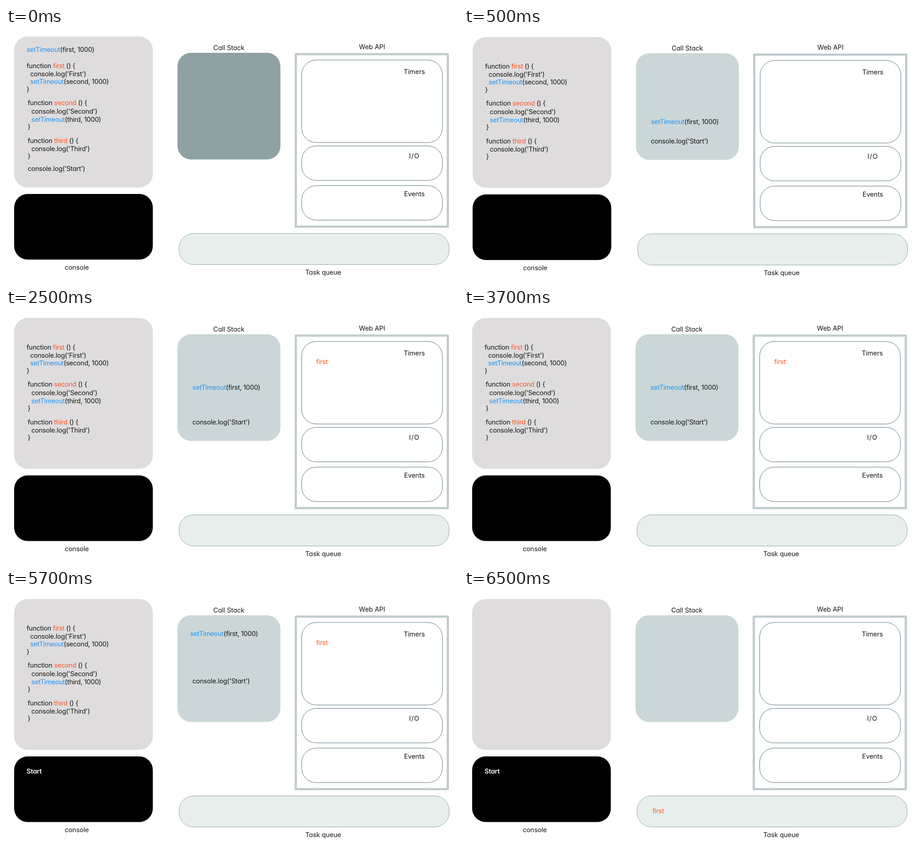
An HTML page for the animation above (8 s loop, 999 px wide and 561 px high).

```html
<!DOCTYPE html>
<html lang="en">
<head>
<meta charset="utf-8">
<title>Event loop</title>
<style>
html, body { margin: 0; width: 100%; height: 100%; overflow: hidden; background: #fff; }
svg { display: block; width: 999px; height: 561px; }
text {
  font: 400 14.6px Inter, Lato, sans-serif;
  font-feature-settings: "cv11";
  letter-spacing: -.28px;
  fill: #161616;
}
.label { text-anchor: middle; letter-spacing: -.1px; }
.wide { letter-spacing: 1px; }
.call { fill: #2196f3; }
.name { fill: #ff5722; }
.out { font-weight: 600; fill: #fff; }
.slot { fill: #fff; stroke: #56717f; }

.stage, .stack, .top, .code, .calls, .pushed, .log, .timer, .printed, .queued {
  animation: 8s step-end infinite;
}
.stage { animation-name: nudge; }
.stack { animation-name: tint; }
.code { animation-name: code; }
.calls { animation-name: calls; }
.pushed { animation-name: pushed; }
.top { animation-name: rise; }
.log { animation-name: log; }
.timer { animation-name: timer; }
.printed { animation-name: printed; }
.queued { animation-name: queued; }

@keyframes nudge {
  0% { transform: none; }
  6.25% { transform: translate(1px, 1px); }
  31.25%, 100% { transform: translate(0, 1px); }
}
@keyframes tint {
  0% { fill: #8ea1a3; }
  6.25%, 100% { fill: #cad6d7; }
}
@keyframes code {
  0% { visibility: visible; }
  81.25%, 100% { visibility: hidden; }
}
@keyframes calls {
  0% { visibility: visible; }
  6.25%, 100% { visibility: hidden; }
}
@keyframes pushed {
  0% { visibility: hidden; }
  6.25% { visibility: visible; }
  81.25%, 100% { visibility: hidden; }
}
@keyframes rise {
  0% { transform: none; }
  31.25% { transform: translate(0, -34px); }
  56.25%, 100% { transform: translate(-5px, -111px); }
}
@keyframes log {
  0% { transform: none; }
  56.25%, 100% { transform: translate(0, -49px); }
}
@keyframes timer {
  0% { visibility: hidden; }
  31.25% { visibility: visible; }
  81.25%, 100% { visibility: hidden; }
}
@keyframes printed {
  0% { visibility: hidden; }
  56.25%, 100% { visibility: visible; }
}
@keyframes queued {
  0% { visibility: hidden; }
  81.25%, 100% { visibility: visible; }
}
</style>
</head>
<body>
<svg viewBox="0 0 999 561">
  <g class="stage">
    <rect x="18" y="19" width="306.5" height="334.5" rx="30" fill="#dedcdd"/>
    <rect x="18" y="368" width="306.5" height="145.5" rx="30"/>
    <rect class="stack" x="379" y="55" width="227.5" height="236.5" rx="30"/>
    <rect x="640.5" y="58" width="336" height="382.5" fill="#fff" stroke="#c2cccf" stroke-width="5" stroke-linejoin="round"/>
    <rect class="slot" x="653.5" y="71" width="311" height="183" rx="32"/>
    <rect class="slot" x="653.5" y="261.5" width="311" height="76.5" rx="32"/>
    <rect class="slot" x="653.5" y="349.5" width="311" height="76.5" rx="32"/>
    <rect x="382.5" y="455.5" width="597" height="69" rx="32" fill="#e7eeeb" stroke="#8ba7a5"/>

    <text class="label" x="492.5" y="49">Call Stack</text>
    <text class="label" x="809" y="47">Web API</text>
    <text class="label" x="902.5" y="102">Timers</text>
    <text class="label wide" x="902.5" y="289">I/O</text>
    <text class="label" x="902.5" y="373">Events</text>
    <text class="label" x="156.5" y="536">console</text>
    <text class="label" x="701" y="547">Task queue</text>

    <g class="calls">
      <text x="45.5" y="53"><tspan class="call">setTimeout</tspan>(first, 1000)</text>
      <text x="48" y="317">console.log('Start')</text>
    </g>

    <g class="code">
      <text x="45.5" y="89">function <tspan class="name">first</tspan> () {</text>
      <text x="53.5" y="107">console.log('First')</text>
      <text x="53.5" y="124"><tspan class="call">setTimeout</tspan>(second, 1000)</text>
      <text x="45.5" y="141">}</text>

      <text x="48" y="171">function <tspan class="name">second</tspan> () {</text>
      <text x="56" y="190">console.log('Second')</text>
      <text x="56" y="208"><tspan class="call">setTimeout</tspan>(third, 1000)</text>
      <text x="48" y="224">}</text>

      <text x="48" y="255">function <tspan class="name">third</tspan> () {</text>
      <text x="56" y="273">console.log('Third')</text>
      <text x="48" y="289">}</text>
    </g>

    <g class="pushed">
      <text class="top" x="412" y="212"><tspan class="call">setTimeout</tspan>(first, 1000)</text>
      <text class="log" x="412" y="255">console.log('Start')</text>
    </g>
    <text class="timer name" x="685.5" y="121">first</text>
    <text class="printed out" x="45.5" y="406">Start</text>
    <text class="queued name" x="416.5" y="494">first</text>
  </g>
</svg>
</body>
</html>
```
